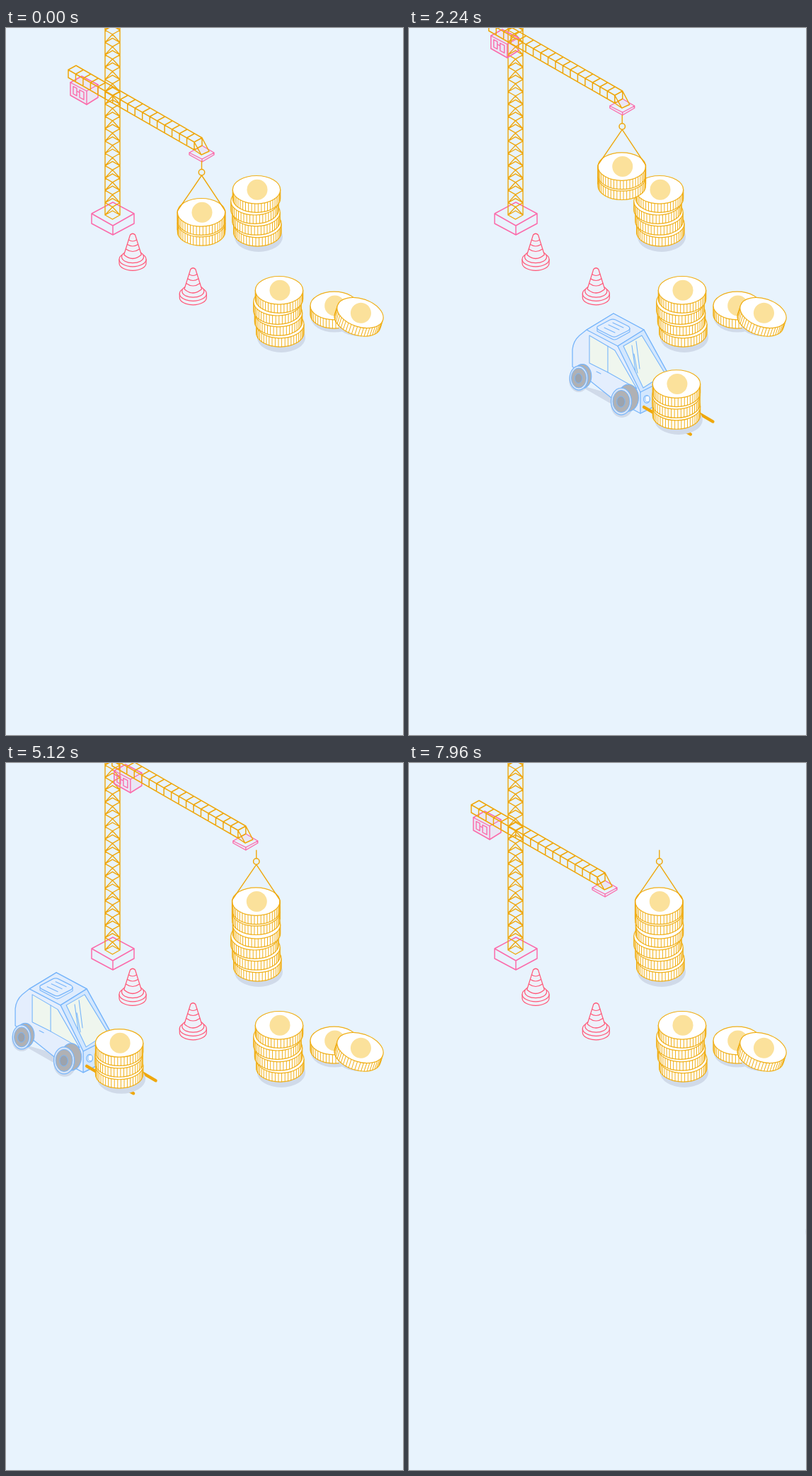
Write an HTML page that moves like this. It is 561 px wide and 998 px high and loops after 8000 ms.

```html
<!DOCTYPE html>
<html lang="en">
<head>
<meta charset="utf-8">
<title>Coin yard</title>
<style>
html, body { margin: 0; width: 100%; height: 100%; overflow: hidden; background: #e8f3fd; }
svg { display: block; width: 561px; height: 998px; }
path { stroke-linejoin: round; stroke-linecap: round; }
</style>
</head>
<body>
<svg id="stage" viewBox="0 0 561 998" fill="none"></svg>
<script>
const GOLD = '#efa70c', COIN = '#f0b01a', PINK = '#fb6cab', RED = '#ff5878', BLUE = '#78b6fb';
const SHADE = '#d0dae9', GREY = '#b0b1b4', GLASS = '#eff6ee';

const path = (d, stroke, width = 1.3, fill = 'none') =>
  `<path d="${d}" stroke="${stroke}" stroke-width="${width}" fill="${fill}"/>`;
const oval = (x, y, rx, ry, fill, stroke = 'none', width = 1.2) =>
  `<ellipse cx="${x}" cy="${y}" rx="${rx}" ry="${ry}" fill="${fill}" stroke="${stroke}" stroke-width="${width}"/>`;
const group = (content, transform = '', id = '') =>
  `<g id="${id}" transform="${transform}">${content}</g>`;

// A coin whose face is centred on the origin
const RX = 33.7, RY = 19.8, THICK = 12.3;
function coin(marked) {
  const body = `M${-RX} 0V${THICK}A${RX} ${RY} 0 0 0 ${RX} ${THICK}V0`;
  let ribs = '';
  for (let i = 1; i < 23; i++) {
    const a = i * Math.PI / 23;
    ribs += `M${(RX * Math.cos(a)).toFixed(1)} ${(RY * Math.sin(a)).toFixed(1)}v${THICK}`;
  }
  return path(body, COIN, 1.2, '#fff') + path(ribs, COIN, 1) +
    oval(0, 0, RX, RY, '#fff', COIN, 1.2) +
    (marked ? '<circle cx="1" r="14.5" fill="#fbe19b"/>' : '');
}

// Shifts list the sideways offset of each coin from the top down
function stack(x, top, step, shifts, shadow = true) {
  const y = top + RY;
  let out = shadow ? oval(x + 3, y + step * shifts.length + 3, 34, 21, SHADE) : '';
  for (let i = shifts.length - 1; i >= 0; i--)
    out += group(coin(i === 0), `translate(${x + shifts[i]} ${y + i * step})`);
  return out;
}

function cone(x, y) {
  const fill = '#eef1fa';
  return group(
    path('M-19 36.5V42A19 10.3 0 0 0 19 42V36.5', RED, 1.2, fill) +
    oval(0, 36.5, 19, 10.3, fill, RED) +
    oval(0, 33, 15.5, 8.7, fill, RED) +
    path('M-3.5 2Q0 -1.5 3.5 2L12.3 30Q0 41 -12.3 30Z', RED, 1.2, fill) +
    path('M-5.6 9Q0 13 5.6 9M-7.5 15.5Q0 20.5 7.5 15.5M-9.6 22Q0 29 9.6 22', RED, 1.2),
    `translate(${x} ${y})`);
}

function mast() {
  let d = 'M140 -10V264L150.5 270L161 264V-10';
  for (let y = 264; y > -20; y -= 17.4)
    d += `M140 ${y}l10.5 6l10.5 -6l-10.5 -6zM140 ${y}l10.5 -11.4l10.5 11.4`;
  return path('M151 246L181 262L151 279L121 262ZM121 262V276L151 292L181 276V262M151 279V292', PINK, 1.5) +
    path(d, GOLD, 1.4);
}

function boom() {
  const cabin =
    path('M91 77L107 68L130 80V98L114 108L91 95Z', PINK, 1.5, '#fb6cab18') +
    path('M91 77L114 89L130 80M114 89V108', PINK, 1.4) +
    path('M95 82.5l5 2.7v10.5l-5 -2.7zM104 87.5l6 3.2v10.5l-6 -3.2zM100 89l4 2.2', PINK, 1.4);
  const tip = path('M277 166L294 176L277 185L259 176ZM259 176V179L277 189L294 179V176M277 185V189', PINK, 1.3, '#fb6cab18');
  let d = 'M88 59L266 161V172L88 70ZM88 59L99 53L277 155L266 161';
  for (let i = 1; i < 17; i++)
    d += `M${88 + i * 10.47} ${59 + i * 6}v11M${88 + i * 10.47} ${59 + i * 6}l11 -6`;
  d += 'M277 155L287 174L276 179L266 172L277 166ZM266 161L276 179';
  return cabin + tip + path(d, GOLD, 1.5);
}

function load() {
  return stack(276, 240.5, 14.8, [0, 0], false) +
    path('M276.5 188V199.5M242.3 285V258L276.5 208L309.7 258V285', GOLD, 1.4) +
    oval(276.5, 203.7, 4.2, 4.2, '#e8f3fd', GOLD, 1.5);
}

function wheel(x, y, rx, ry, depth) {
  return oval(x + depth, y - depth * 0.5, rx, ry, GREY, BLUE) +
    oval(x, y, rx, ry, '#d9e5f6', BLUE) +
    oval(x, y, rx * 0.82, ry * 0.82, GREY, BLUE, 1) +
    oval(x - 0.5, y + 0.5, rx * 0.4, ry * 0.4, '#9ca3ad', BLUE, 1);
}

function truck() {
  const shadow = oval(61, 409, 14, 17, SHADE) + oval(122, 443, 16, 19, SHADE) +
    path('M66 418L108 442V430Z', SHADE, 2, SHADE);
  const body =
    path('M52 390V366Q53 354 62 346L72 338L110 315L153 338L186 398L166 420V447L148 456L107 434Z', BLUE, 1.3, '#e4eefd') +
    path('M72 338L110 315L153 338L116 361Z', BLUE, 1.3, '#dfecfd') +
    path('M116 361L153 338L186 398L166 420V447L148 456V426Z', BLUE, 1.3, '#d3e7fe') +
    path('M148 426L166 417', BLUE) +
    path('M124 361L150 346L183 400L152 420Z', BLUE, 1.1, GLASS) +
    path('M76 346L112 367L143 421L102 398L76 385Z', BLUE, 1.1, GLASS) +
    path('M102 361V398M86 397l6 3M136 360L141 396M142 354L147 393M139 372L144 399', BLUE, 1.1) +
    path('M88 333L105 324Q109 322 113 324L131 333Q135 336 131 339L115 347Q111 349 107 347L89 338Q85 335 88 333Z', BLUE, 1.2, '#e4effd') +
    path('M87 336V340L108 351Q111 353 115 351L133 341V336M97 335l15 7M103 331l15 7M109 328l15 7', BLUE, 1.1);
  const forks = path('M153 447L219 485.5M190 432L250.5 467.5', GOLD, 4.3);
  return shadow + body + wheel(61, 406, 12.8, 17, 5) + wheel(121, 439, 14.5, 19, 10) +
    oval(157, 436, 4.3, 5.4, '#edf5fe', BLUE) + oval(158, 435.5, 3.2, 4.3, '#f5f9fe', BLUE, 0.9) +
    forks + stack(199, 394.7, 15.8, [0, -0.5, 0]);
}

const stage = document.getElementById('stage');
stage.innerHTML =
  mast() + cone(179, 290) + cone(264.3, 338.5) +
  stack(354, 208.5, 15.9, [0, -2.5, -0.5, 1.3]) +
  stack(386, 350.5, 15.9, [0, -2.5, -1, 1.3]) +
  oval(464, 409, 33, 20.5, SHADE) + group(coin(true), 'translate(463.7 392)') +
  oval(500, 419, 31, 16, SHADE) + group(coin(true), 'translate(500.5 402) rotate(18)') +
  group(boom(), '', 'boom') + group(load(), '', 'load') + group(truck(), '', 'truck');

// Linear interpolation through [time, value] points
function track(t, points) {
  for (let i = 1; i < points.length; i++) {
    const [t0, a] = points[i - 1], [t1, b] = points[i];
    if (t <= t1) return a + (b - a) * (t - t0) / (t1 - t0);
  }
  return points[points.length - 1][1];
}

const move = (id, x, y) =>
  document.getElementById(id).setAttribute('transform', `translate(${x.toFixed(2)} ${y.toFixed(2)})`);

function draw(now) {
  const t = Math.floor(now / 40) * 40 % 8000;
  const x = track(t, [[0, 0], [1600, 0], [3600, 77.3], [4800, 77.3], [6400, 0]]);
  move('boom', x, track(t, [[0, 0], [1600, -66], [6400, -66], [7600, 0]]));
  move('load', track(t, [[0, 0], [1600, 0], [3600, 77.3]]), track(t, [[0, 0], [1600, -64.7]]));
  const drive = t % 4000 - 1320;
  move('truck', drive * 0.1945, drive * 0.0957);
  requestAnimationFrame(draw);
}
draw(0);
</script>
</body>
</html>
```
